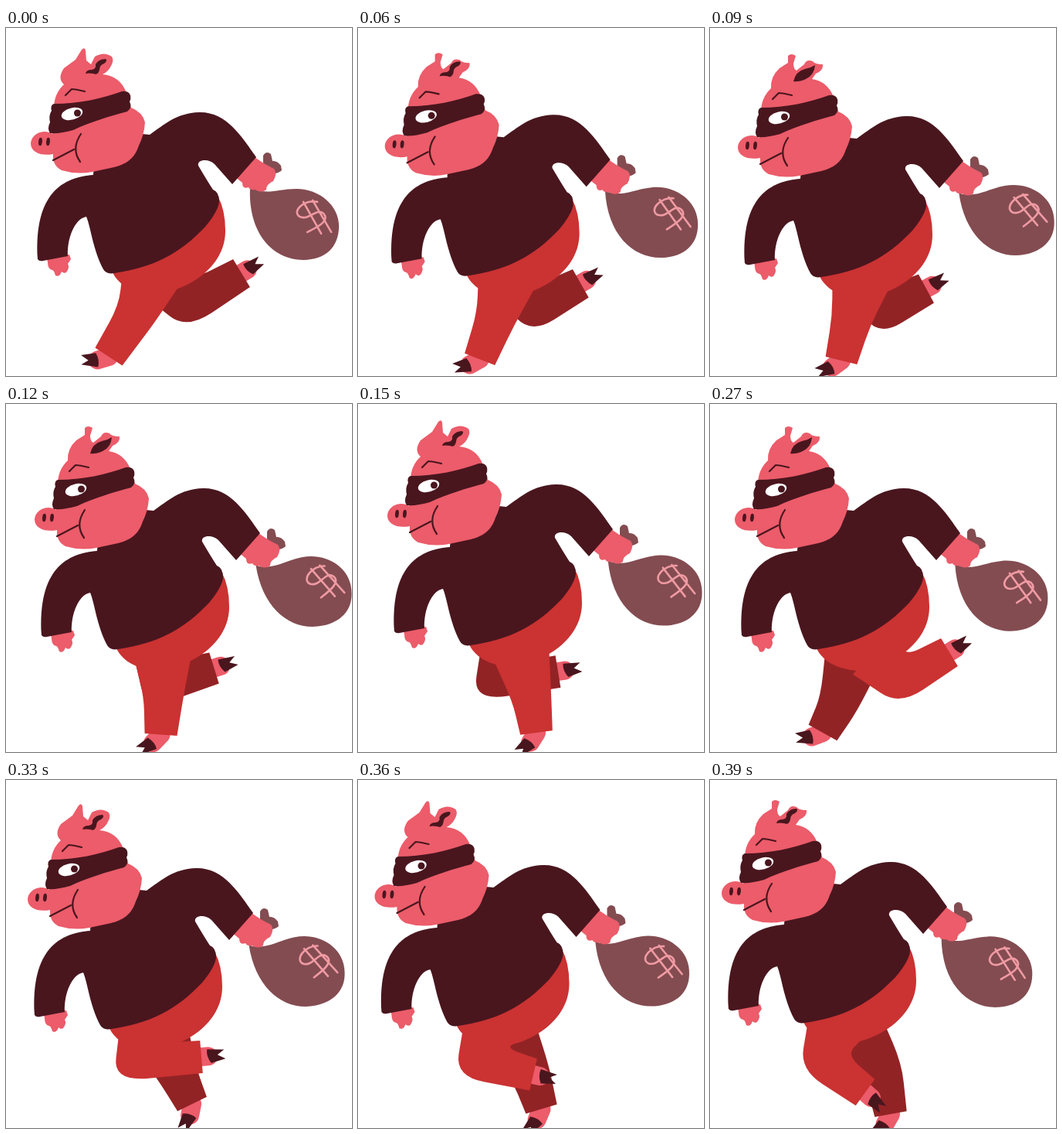
Recreate the animation shown at these times as an HTML page with a canvas. Size 448x450 px, loop 0.42 s.

```html
<!DOCTYPE html>
<html lang="en">
<head>
<meta charset="utf-8">
<title>Running pig burglar</title>
<style>
  html, body { margin: 0; width: 100%; height: 100%; overflow: hidden; background: #fff; }
  canvas { display: block; width: 448px; height: 450px; }
</style>
</head>
<body>
<canvas id="stage" width="448" height="450"></canvas>
<script>
const ctx = document.getElementById('stage').getContext('2d');
const SKIN = '#ec5c6a', DARK = '#49161e', RED = '#cb3232', SHADE = '#922325', BAG = '#834c51', PINK = '#f09aa3';
const STEP = 30, STEPS = 14;
const HIP = 38, KNEE = 25.5, CUFF = 21; // half widths of a trouser leg

// Steps at which the key points stand; those between are blended.
const keys = [0, 3, 5, 7, 9, 11, 13, 14];
const sway = [[0, 0], [4, 5], [6, -5], [10, 4], [0, 0], [-4, 5], [-17, -3]];

// Knee x, y and ankle x, y
const nearLeg = [
  [169, 370, 133, 425], [183, 378, 170, 430], [225, 380, 231, 425], [257, 380, 286, 421],
  [249, 358, 310, 321], [171, 365, 253, 358], [147, 365, 201, 404]
];
const farLeg = [
  [239, 357, 305, 317], [230, 364, 280, 337], [180, 359, 259, 346], [152, 364, 207, 391],
  [167, 387, 146, 425], [223, 382, 241, 419], [224, 376, 234, 432]
];

const shirt = 'M113 190C75 193 36 212 41 299Q43 302 48 301L80 295C79 270 90 246 104 244C110 258 112 285 126 312Q130 319 140 317C190 310 225 292 258 257C268 245 276 232 276 224Q276 212 268 209Q262 200 249 178C247 170 262 168 270 176L293 202L324 167C305 140 285 108 250 109C220 110 205 125 186 138L176 137L120 181Q112 182 113 190Z';
const hips = 'M134 305C140 330 160 342 190 345C235 340 284 310 284 262Q284 235 274 217Z';
const face = 'L156 84L162 103Q177 109 180 122Q179 138 172 152C166 170 155 176 140 180L112 186Q92 190 72 184Q60 178 61 163C46 166 32 161 32 149C33 136 50 130 60 137Z';
const pointed = 'M60 137L62 104Q62 85 75 73Q66 65 75 52L90 41L98 28Q102 24 103 29L104 42L110 47L115 37Q127 30 137 37Q140 42 136 49Q133 56 125 60Q148 62 156 84';
const blunt = 'M60 137L62 104Q62 85 75 73Q74 58 86 47L97 40L97 31Q101 27 107 31L104 41Q104 48 108 50L118 42Q121 35 129 38Q132 42 142 42Q143 50 133 54L128 61Q148 64 156 84';
const wavyEar = 'M103 59Q104 54 111 54Q117 53 116 47Q120 40 129 40Q132 42 127 46Q121 48 121 54Q119 62 113 59Q107 58 103 59Z';
const leafEar = 'M104 64Q107 51 119 48Q126 47 132 43Q131 56 120 61Q111 65 104 64Z';
const heads = [[pointed, wavyEar], [blunt, wavyEar], [blunt, leafEar]];

const mask = 'M62 98C95 98 125 91 150 82Q159 81 161 87Q162 92 160 95Q164 103 157 108C135 114 110 121 87 132Q70 137 57 136Q53 130 57 122Q55 113 59 107Q57 100 62 98Z';
const leftHand = 'M53 298L82 293L84 299L80 305Q83 309 78 316Q75 318 72 315Q69 323 64 320Q62 313 60 313Q54 312 54 303Z';
const rightHand = 'M296 192L318 164Q332 175 347 182Q352 188 346 198Q337 202 337 209Q330 214 323 209Q316 210 314 206Q306 209 306 200Z';
const knot = 'M333 176L333 165Q337 158 343 163L345 172Q351 171 356 178L357 184Q352 189 343 188Z';
const bag = 'M316 206C338 217 350 208 376 208C406 208 431 230 431 256C431 285 412 300 385 300C345 300 313 265 316 206Z';
const dollar = 'M385 225L408 266M397 223L421 264M403 225C388 221 369 236 380 244C392 250 402 232 411 240C420 250 402 258 390 264';
const hoof = 'M-8 -9L14 -7L5 -1L15 5L-4 9Q-10 0 -8 -9Z';

const lerp = (a, b, k) => a + (b - a) * k;

function pose(rows, step) {
  const i = keys.findIndex((k, n) => step < keys[n + 1]);
  const k = (step - keys[i]) / (keys[i + 1] - keys[i]);
  const next = rows[(i + 1) % rows.length];
  return rows[i].map((v, n) => lerp(v, next[n], k));
}

function fill(d, color) {
  ctx.fillStyle = color;
  ctx.fill(new Path2D(d));
}

function line(d, color, width) {
  ctx.strokeStyle = color;
  ctx.lineWidth = width;
  ctx.stroke(new Path2D(d));
}

function oval(x, y, rx, ry, turn, color) {
  ctx.fillStyle = color;
  ctx.beginPath();
  ctx.ellipse(x, y, rx, ry, turn, 0, Math.PI * 2);
  ctx.fill();
}

// Moves, optionally turns, and paints in that local space
function place(x, y, turn, paint) {
  ctx.save();
  ctx.translate(x, y);
  ctx.rotate(turn);
  paint();
  ctx.restore();
}

const polar = ([x, y], length, angle) => [x + length * Math.cos(angle), y + length * Math.sin(angle)];

function bend([x0, y0], [x, y], [x1, y1]) {
  ctx.lineTo(x0, y0);
  ctx.lineTo(lerp(x, x0, .4), lerp(y, y0, .4));
  ctx.quadraticCurveTo(x, y, lerp(x, x1, .4), lerp(y, y1, .4));
  ctx.lineTo(x1, y1);
}

function drawFoot(ankle, shin) {
  // A foot near the ground flexes forward.
  const ground = Math.min(1, Math.max(0, (ankle[1] - 400) / 20));
  const turn = shin + ground * 1.05;
  const toe = polar(polar(ankle, 6, shin), 10 + 8 * ground, turn);
  line(`M${ankle}L${polar(toe, -7, turn)}`, SKIN, 24);
  place(...toe, turn, () => fill(hoof, DARK));
}

function drawLeg([kx, ky, ax, ay], [dx, dy], color) {
  const hip = [lerp(195, kx, .3) + dx, 322 + dy], knee = [kx, ky], ankle = [ax, ay];
  const thigh = Math.atan2(ky - hip[1], kx - hip[0]);
  const shin = Math.atan2(ay - ky, ax - kx);
  const half = Math.atan2(Math.sin(shin - thigh), Math.cos(shin - thigh)) / 2;
  const miter = KNEE * Math.min(1.6, 1 / Math.cos(half));
  const quarter = Math.PI / 2;
  const edge = side => [
    polar(hip, side * HIP, thigh + quarter),
    polar(knee, side * miter, thigh + half + quarter),
    polar(ankle, side * CUFF, shin + quarter)
  ];
  drawFoot(ankle, shin);
  ctx.fillStyle = color;
  ctx.beginPath();
  bend(...edge(1));
  bend(...edge(-1).reverse());
  ctx.fill();
}

function drawBag(step) {
  const swing = -6 - 6 * Math.cos((step - 3.7) / 7 * Math.PI * 2);
  place(330, 195, swing * Math.PI / 180, () => {
    ctx.translate(-330, -195);
    fill(bag, BAG);
    line(dollar, PINK, 2.6);
  });
}

function drawHead(step) {
  const [hair, ear] = heads[Math.floor((step + 1) / 2) % 3];
  fill(hair + face, SKIN);
  fill(ear, DARK);
  fill(mask, DARK);
  oval(85.5, 111, 14, 7.6, -.25, '#fff');
  oval(92.5, 110, 4.5, 4.5, 0, DARK);
  line('M77 87L85 79Q90 79 102 82', DARK, 2.2);
  line('M61 171L88 157M97 137Q84 156 96 173', DARK, 2.2);
  for (const x of [44.5, 54.5]) oval(x, 147, 2.4, 5.2, .1, DARK);
}

function draw(step) {
  const shift = pose(sway, step);
  ctx.fillStyle = '#fff';
  ctx.fillRect(0, 0, 448, 450);
  place(...shift, 0, () => {
    drawBag(step);
    fill(knot, BAG);
    fill(rightHand, SKIN);
    fill(leftHand, SKIN);
  });
  drawLeg(pose(farLeg, step), shift, SHADE);
  place(...shift, 0, () => fill(hips, RED));
  drawLeg(pose(nearLeg, step), shift, RED);
  place(...shift, 0, () => {
    fill(shirt, DARK);
    drawHead(step);
  });
}

ctx.lineCap = ctx.lineJoin = 'round';

function tick() {
  draw(Math.floor(performance.now() / STEP) % STEPS);
  requestAnimationFrame(tick);
}
tick();
</script>
</body>
</html>
```
